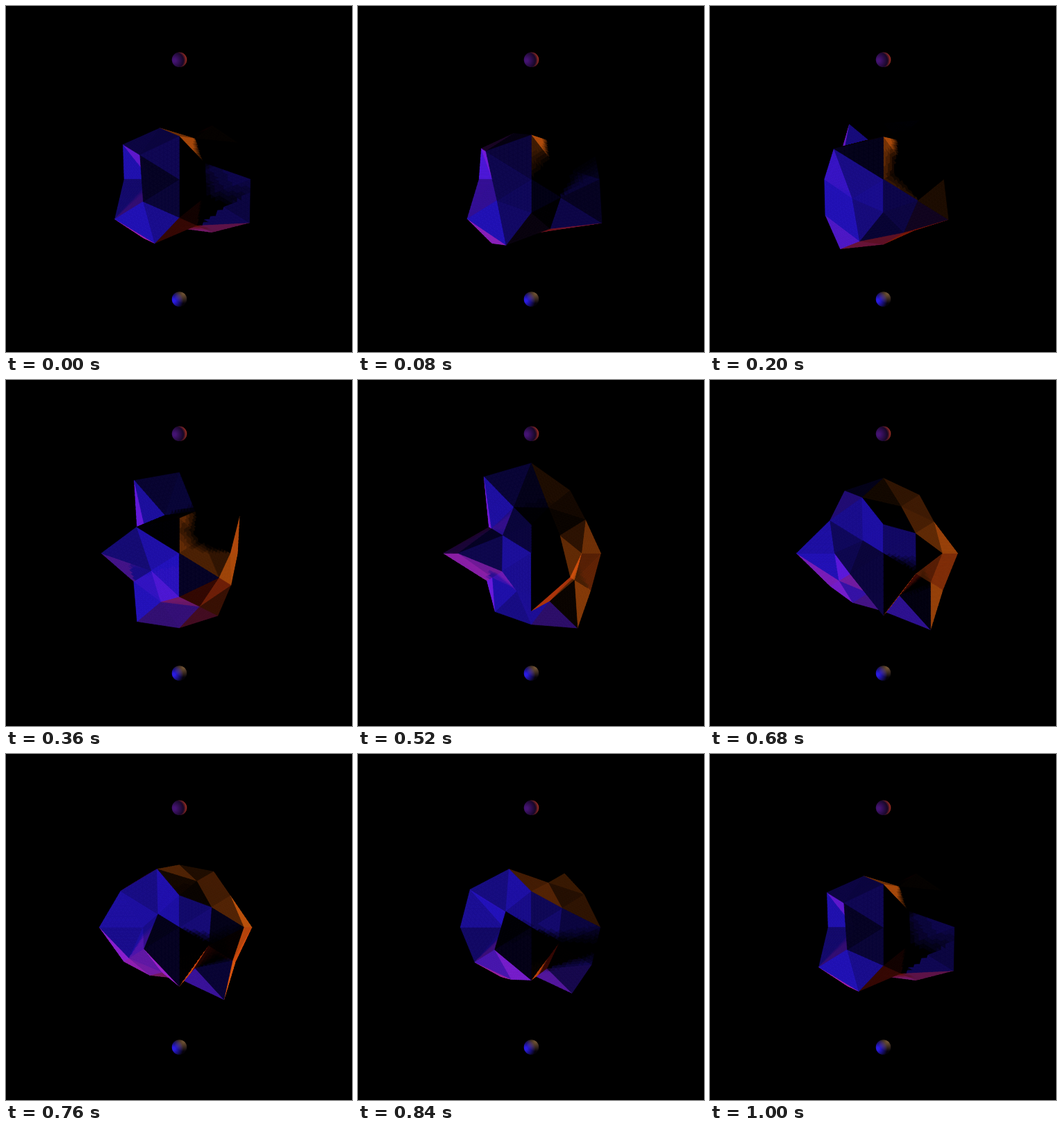
Recreate the animation shown at these times as an HTML page with a canvas. Size 498 by 498 pixels, loop 1.04 s.

```html
<!DOCTYPE html>
<html lang="en">
<head>
<meta charset="utf-8">
<title>Faceted body</title>
<style>
  html, body { margin: 0; width: 100%; height: 100%; overflow: hidden; background: #000; }
  canvas { display: block; }
</style>
</head>
<body>
<canvas id="stage" width="498" height="498"></canvas>
<script>
const SIZE = 498, MID = 249.4, STEP = 40, STEPS = 26, SPLIT = 10;

// Radius wave per vertex: mean, swing, moment of the peak. Keys are directions times ten.
const WAVES = {
  '0 0 10': [85, 25, .31],
  '0 5 9': [98, 23, .09],     '0 -5 9': [129, 42, .65],
  '-5 3 8': [100, 42, .2],    '-5 -3 8': [93, 13, .9],
  '5 3 8': [77, 16, .72],     '5 -3 8': [95, 20, .42],
  '-8 5 3': [84, 25, .86],    '-8 -5 3': [92, 23, .03],
  '8 5 3': [101, 11, .2],     '8 -5 3': [101, 25, .05],
  '-9 0 5': [88, 46, .41],    '9 0 5': [102, 19, .95],
  '-10 0 0': [102, 27, .59],  '10 0 0': [90, 17, .67],
  '-3 8 5': [85, 19, .8],     '3 8 5': [76, 7, .66],
  '-3 -8 5': [91, 26, .08],   '3 -8 5': [84, 12, .28],
  '0 10 0': [92, 38, .5],     '0 -10 0': [87, 21, .4],
  '-5 9 0': [97, 34, .47],    '5 9 0': [98.5, 9, .43],
  '-5 -9 0': [100, 19, .26],  '5 -9 0': [107, 24, .62],
  '8 -5 -3': [90, 18, .6],    '-8 -5 -3': [82, 17, .8]
};
const STILL = [75, 0, 0];

const sub = (a, b) => [a[0] - b[0], a[1] - b[1], a[2] - b[2]];
const add = (a, b, k = 1) => [a[0] + b[0] * k, a[1] + b[1] * k, a[2] + b[2] * k];
const dot = (a, b) => a[0] * b[0] + a[1] * b[1] + a[2] * b[2];
const cross = (a, b) => [
  a[1] * b[2] - a[2] * b[1],
  a[2] * b[0] - a[0] * b[2],
  a[0] * b[1] - a[1] * b[0]
];
const unit = a => a.map(v => v / Math.hypot(...a));

// Each light is sampled along a short line, which softens its shadows.
const LIGHTS = [
  { dir: [-.88, -.28, .34], rgb: [40, 21, 212] },
  { dir: [.8, .22, -.5], rgb: [255, 112, 18] },
  { dir: [.1, -.75, -.6], rgb: [140, 24, 12] },
  { dir: [-.7, -.1, -.62], rgb: [110, 12, 20] }
].map(({ dir, rgb }) => ({
  dir: unit(dir),
  rgb,
  rays: [-2, -1, 0, 1, 2].map(s => unit(add(dir, [0, s * .03, s * .05])))
}));

// Icosahedron with every face split in four.
const dirs = [], index = new Map(), faces = [];
function vertex(p) {
  const d = unit(p), key = d.map(v => Math.round(v * 10)).join(' ');
  if (!index.has(key)) {
    index.set(key, dirs.length);
    dirs.push({ d, wave: WAVES[key] || STILL });
  }
  return index.get(key);
}
function addFace(...pts) {
  const n = cross(sub(pts[1], pts[0]), sub(pts[2], pts[0]));
  if (dot(n, pts[0]) < 0) pts.reverse();
  faces.push(pts.map(vertex));
}
function buildMesh() {
  const g = (1 + Math.sqrt(5)) / 2, base = [];
  for (const s of [-1, 1]) for (const q of [-g, g]) base.push([s, q, 0], [0, s, q], [q, 0, s]);
  const pts = base.map(unit);
  const near = (a, b) => Math.hypot(...sub(a, b)) < 1.1;
  pts.forEach((a, i) => pts.forEach((b, j) => pts.forEach((c, k) => {
    if (!(i < j && j < k && near(a, b) && near(b, c) && near(a, c))) return;
    const ab = unit(add(a, b)), bc = unit(add(b, c)), ca = unit(add(c, a));
    addFace(a, ab, ca);
    addFace(b, bc, ab);
    addFace(c, ca, bc);
    addFace(ab, bc, ca);
  })));
}

function pose(phase) {
  const pts = dirs.map(({ d, wave: [mean, swing, peak] }) => {
    const r = mean + swing * Math.cos(2 * Math.PI * (phase - peak));
    return d.map(v => v * r);
  });
  return faces.map(f => {
    const [a, b, c] = f.map(i => pts[i]);
    const e1 = sub(b, a), e2 = sub(c, a);
    return { a, b, c, e1, e2, n: unit(cross(e1, e2)) };
  });
}

function hits(tri, from, ray) {
  const p = cross(ray, tri.e2), det = dot(tri.e1, p);
  if (Math.abs(det) < 1e-6) return false;
  const s = sub(from, tri.a), u = dot(s, p) / det;
  if (u < 0 || u > 1) return false;
  const q = cross(s, tri.e1), v = dot(ray, q) / det;
  return v >= 0 && u + v <= 1 && dot(tri.e2, q) / det > .5;
}

// Lights a face looks towards, each with the faces that may block it.
function lightsOn(tri, tris) {
  const above = p => dot(sub(p, tri.a), tri.n) > .5;
  const front = tris.filter(t => t !== tri && [t.a, t.b, t.c].some(above));
  return LIGHTS
    .map(light => ({
      ...light,
      facing: dot(tri.n, light.dir),
      blockers: front.filter(t => dot(t.n, light.dir) > -.1)
    }))
    .filter(light => light.facing > 0);
}

function shade(lights, n, point) {
  const from = add(point, n, .6);
  let rgb = [0, 0, 0];
  for (const { rgb: tint, rays, facing, blockers } of lights) {
    const open = rays.filter(ray => !blockers.some(t => hits(t, from, ray))).length;
    rgb = add(rgb, tint, facing * open / rays.length);
  }
  return `rgb(${rgb.map(v => Math.min(255, Math.round(v)))})`;
}

function patches(tris) {
  const list = [];
  for (const tri of tris) {
    if (tri.n[2] <= 0) continue;
    const lights = lightsOn(tri, tris);
    const at = (i, j) => add(add(tri.a, tri.e1, i / SPLIT), tri.e2, j / SPLIT);
    const put = (...pts) => {
      const mid = add(add(pts[0], pts[1]), pts[2]).map(v => v / 3);
      list.push({ pts, z: mid[2], color: shade(lights, tri.n, mid) });
    };
    for (let i = 0; i < SPLIT; i++) {
      for (let j = 0; i + j < SPLIT; j++) {
        put(at(i, j), at(i + 1, j), at(i, j + 1));
        if (i + j < SPLIT - 1) put(at(i + 1, j), at(i + 1, j + 1), at(i, j + 1));
      }
    }
  }
  return list.sort((p, q) => p.z - q.z);
}

function ball(ctx, y, glows) {
  ctx.save();
  ctx.beginPath();
  ctx.arc(249.5, y, 10.8, 0, 7);
  ctx.clip();
  ctx.fillStyle = '#06030a';
  ctx.fillRect(230, y - 20, 40, 40);
  ctx.globalCompositeOperation = 'lighter';
  for (const [dx, dy, bright, dark, color] of glows) {
    const x = 249.5 + dx, g = ctx.createRadialGradient(x, y + dy, bright, x, y + dy, dark);
    g.addColorStop(0, color);
    g.addColorStop(1, '#000');
    ctx.fillStyle = g;
    ctx.fillRect(230, y - 20, 40, 40);
  }
  ctx.restore();
}

function render(step) {
  const canvas = document.createElement('canvas');
  canvas.width = canvas.height = SIZE;
  const ctx = canvas.getContext('2d');
  ctx.fillStyle = '#000';
  ctx.fillRect(0, 0, SIZE, SIZE);
  ball(ctx, 77.3, [[-7, 1, 2, 17, 'rgb(62,16,104)'], [-5, 1, 15.5, 11, 'rgb(150,42,26)']]);
  ball(ctx, 422, [[-8, 2, 2, 14, 'rgb(36,24,215)'], [6, -8, 1, 14, 'rgb(104,78,42)']]);
  ctx.lineWidth = .7;
  ctx.lineJoin = 'round';
  for (const { pts, color } of patches(pose(step / (STEPS - 1)))) {
    ctx.fillStyle = ctx.strokeStyle = color;
    ctx.beginPath();
    for (const [x, y] of pts) ctx.lineTo(MID + x, MID - y);
    ctx.closePath();
    ctx.fill();
    ctx.stroke();
  }
  return canvas;
}

buildMesh();
const stage = document.getElementById('stage').getContext('2d');
const cache = Array.from({ length: STEPS }, (_, i) => render(i));
const start = performance.now();

function tick() {
  const step = Math.floor((performance.now() - start) / STEP) % STEPS;
  stage.drawImage(cache[step], 0, 0);
  requestAnimationFrame(tick);
}
tick();
</script>
</body>
</html>
```
